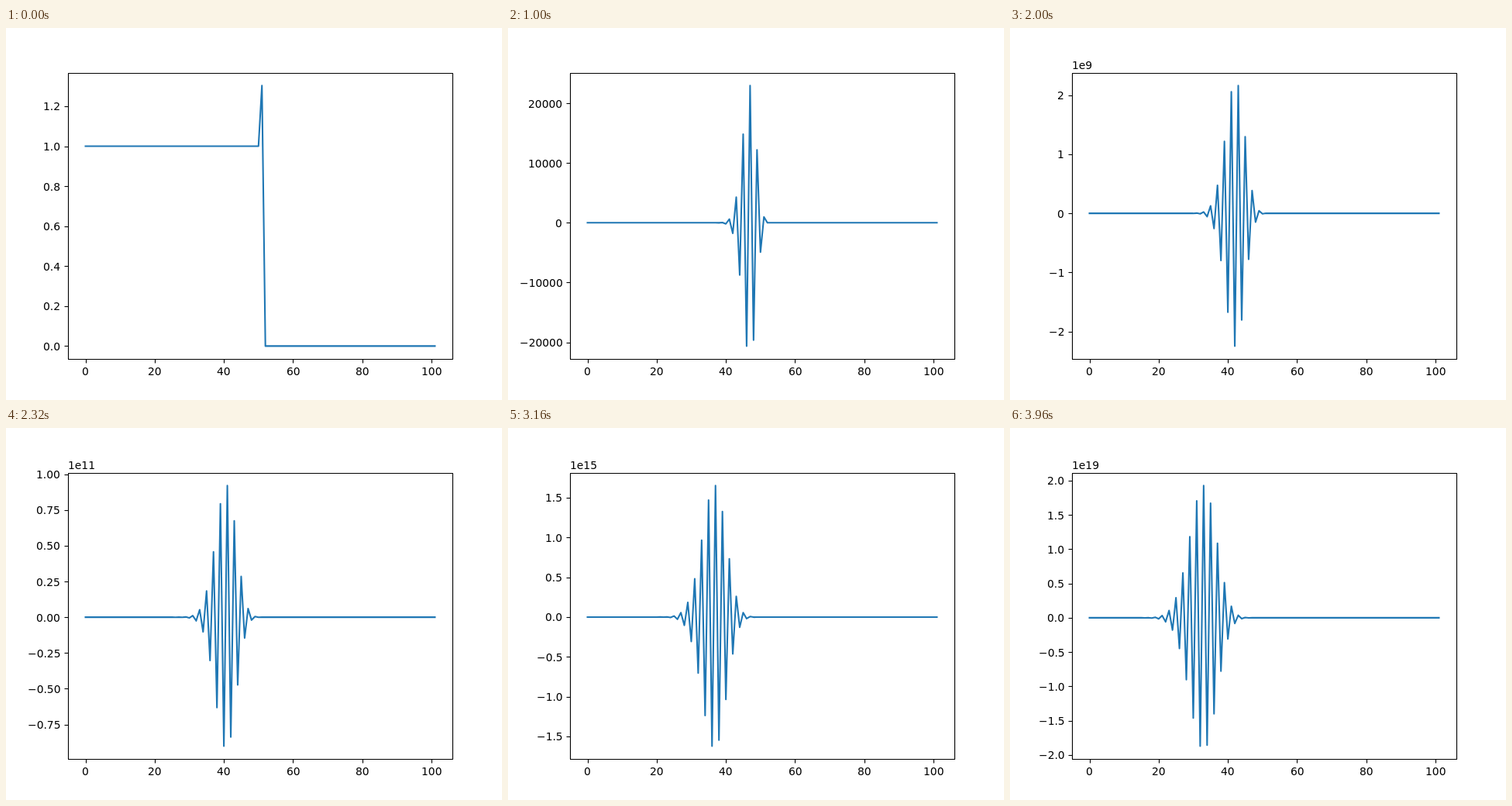
An HTML page with a canvas that plays this animation: 640 px wide and 480 px high, repeating every 4 s.

```html
<!DOCTYPE html>
<html lang="en">
<head>
<meta charset="utf-8">
<title>Unstable advection</title>
<style>
  html, body { margin: 0; width: 100%; height: 100%; overflow: hidden; background: #fff; }
  canvas { display: block; }
</style>
</head>
<body>
<canvas id="plot" width="640" height="480"></canvas>
<script>
const ctx = document.getElementById('plot').getContext('2d');

const STEPS = 100, STEP_MS = 40;
const POINTS = 102, COURANT = 0.303;
const PX = 100 / 72; // pixels per point
const BOX = { left: 80, top: 57.6, right: 576, bottom: 427.2 };
const MARGIN = 0.05, MAX_TICKS = 9;
const TICK_PAD = 7 * PX;

// Downwind differencing of a step profile: the error grows at every step.
function simulate() {
  const states = [];
  let u = Array.from({ length: POINTS }, (_, i) => (i < 52 ? 1 : 0));
  for (let n = 0; n < STEPS; n++) {
    u = u.map((v, i) => i < POINTS - 1 ? v - COURANT * (u[i + 1] - v) : v);
    states.push(u);
  }
  return states;
}

function viewRange(min, max) {
  const pad = (max - min) * MARGIN;
  return [min - pad, max + pad];
}

function niceStep(span) {
  const raw = span / MAX_TICKS;
  const scale = 10 ** Math.floor(Math.log10(raw));
  return [1, 2, 2.5, 5, 10].find(s => s * scale >= raw * (1 - 1e-10)) * scale;
}

function makeTicks([lo, hi]) {
  const step = niceStep(hi - lo);
  const values = [];
  for (let k = Math.ceil(lo / step); k <= Math.floor(hi / step); k++) values.push(k * step);

  const largest = Math.max(...values.map(Math.abs));
  const order = Math.floor(Math.log10(largest) + 1e-9);
  const exponent = order >= 6 ? order : 0;
  const unit = 10 ** exponent;

  let digits = 0;
  const isWhole = v => Math.abs(v - Math.round(v)) < 1e-3;
  while (digits < 4 && !isWhole(step / unit * 10 ** digits)) digits++;

  const label = v => (v < 0 ? '\u2212' : '') + Math.abs(v / unit).toFixed(digits);
  return { values, exponent, label };
}

const scaler = ([lo, hi], from, to) => v => from + (v - lo) / (hi - lo) * (to - from);
const snap = v => Math.floor(v + 0.5) + 0.5;

function stroke(points) {
  ctx.beginPath();
  points.forEach(([x, y]) => ctx.lineTo(x, y));
  ctx.stroke();
}

// align: 0 = left, 0.5 = centre, 1 = right
function text(str, x, y, align) {
  const w = ctx.measureText(str).width;
  ctx.fillText(str, Math.round(x - w * align), Math.round(y));
}

const xRange = viewRange(0, POINTS - 1);
const xTicks = makeTicks(xRange);
const toX = scaler(xRange, BOX.left, BOX.right);

function drawCurve(u, toY) {
  ctx.strokeStyle = '#1f77b4';
  ctx.lineWidth = 1.5 * PX;
  ctx.lineJoin = 'round';
  ctx.lineCap = 'square';
  stroke(u.map((v, i) => [toX(i), toY(v)]));
}

function drawAxes(yTicks, toY) {
  const left = snap(BOX.left), right = snap(BOX.right);
  const top = snap(BOX.top), bottom = snap(BOX.bottom);
  ctx.strokeStyle = ctx.fillStyle = '#000';
  ctx.lineWidth = 0.8 * PX;
  ctx.lineCap = 'butt';
  ctx.font = `${10 * PX}px "DejaVu Sans", sans-serif`;

  for (const v of xTicks.values) {
    const x = toX(v);
    stroke([[snap(x), bottom], [snap(x), bottom + 5]]);
    text(xTicks.label(v), x, BOX.bottom + TICK_PAD + 11, 0.5);
  }
  for (const v of yTicks.values) {
    const y = toY(v);
    stroke([[left, snap(y)], [left - 5, snap(y)]]);
    text(yTicks.label(v), BOX.left - TICK_PAD, y + 5.5, 1);
  }
  if (yTicks.exponent) text('1e' + yTicks.exponent, BOX.left, BOX.top - 3 * PX, 0);

  ctx.strokeRect(left, top, right - left, bottom - top);
}

const states = simulate();

function draw(now) {
  const u = states[Math.floor(Math.max(0, now) / STEP_MS) % STEPS];
  const yRange = viewRange(Math.min(...u), Math.max(...u));
  const toY = scaler(yRange, BOX.bottom, BOX.top);
  ctx.fillStyle = '#fff';
  ctx.fillRect(0, 0, 640, 480);
  drawCurve(u, toY);
  drawAxes(makeTicks(yRange), toY);
}

let start = null;
function loop(now) {
  if (start === null) start = now;
  draw(now - start);
  requestAnimationFrame(loop);
}
draw(0);
requestAnimationFrame(loop);
</script>
</body>
</html>
```
